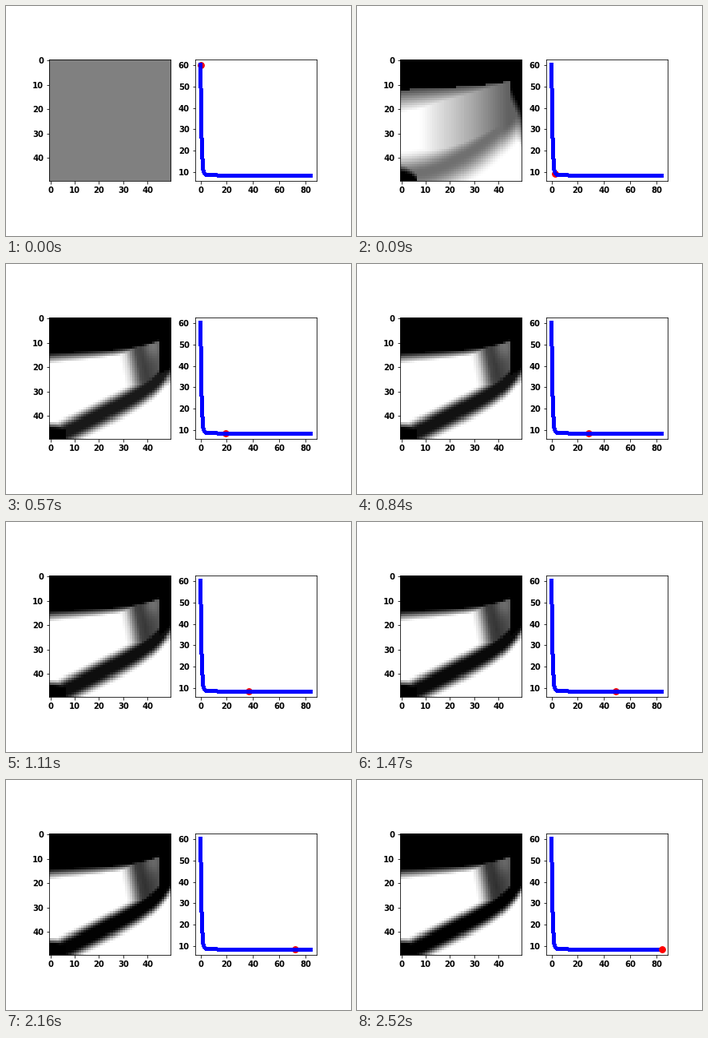
A matplotlib script that plays this animation: 432x288 px, repeating every 2.55 s.

```python
import numpy as np
import matplotlib.pyplot as plt
from matplotlib.animation import FuncAnimation

plt.rcParams["font.family"] = "DejaVu Sans"
plt.rcParams["font.weight"] = "bold"
plt.rcParams["font.size"] = 10

STEPS, SIZE = 85, 50
Y, X = np.mgrid[0:SIZE, 0:SIZE] + 0.5

# Shape parameters at a few iterations, interpolated on a log scale.
KEYS = np.log([3, 7, 19, 84])
SHAPE = {
    # top slab: edge row, rise at the right, darkness and depth below the edge
    "edge": [12.7, 14.3, 15.0, 15.0],
    "rise": [1.5, 2.4, 3.1, 3.1],
    "under": [0.70, 0.85, 0.95, 0.97],
    "depth": [9.5, 4.5, 4.3, 4.2],
    # strut centre line: start, slope, bend, hook at the right end
    "start": [47.8, 50.5, 50.6, 50.6],
    "slope": [0.05, 0.25, 0.50, 0.50],
    "bend": [0.0102, 0.0055, 0.0, 0.0],
    "hook": [0.0, 3.0, 6.5, 6.5],
    # strut profile: core darkness, half width of the core, fades on both sides
    "core": [0.56, 0.83, 0.90, 1.0],
    "half": [0.5, 1.0, 1.6, 2.0],
    "above": [10.0, 8.0, 5.2, 4.6],
    "below": [13.0, 7.2, 5.6, 5.0],
    # column at the right side: lower edge, its slope, fade
    "foot": [12.0, 18.0, 23.0, 26.0],
    "tilt": [2.2, 1.0, -0.5, -1.2],
    "fade": [16.0, 10.0, 7.0, 5.0],
    # block in the lower left corner
    "block": [46.3, 45.8, 45.6, 45.4],
    "arch": [0.065, 0.03, 0.01, 0.01],
    "haze": [5.0, 3.5, 2.8, 2.6],
    # web: light patch at the upper right, lean to the right
    "patch": [0.0, 0.10, 0.14, 0.12],
    "lean": [0.0, 0.2, 0.2, 0.2],
}
# Web between slab and strut: columns and their darkness
WEB_X = np.array([[8, 15, 22, 30, 38, 44],
                  [21, 25, 30, 34.5, 38, 44],
                  [29, 31.5, 34, 36, 38.5, 44],
                  [29.5, 31.5, 34, 36, 38.5, 44]])
WEB_D = np.array([[0, .12, .22, .35, .50, .62],
                  [0, .10, .30, .52, .69, .73],
                  [0, .15, .48, .70, .76, .66],
                  [0, .15, .52, .76, .81, .70]])


def at(t, values):
    return np.interp(t, KEYS, values)


def fall(u):
    """1 for u <= 0, down to 0 at u >= 1."""
    return 1 - np.clip(u, 0, 1)


def soft(u):
    u = np.clip(u, 0, 1)
    return 1 - u * u * (3 - 2 * u)


def shape(i):
    t = np.log(i)
    s = {name: at(t, values) for name, values in SHAPE.items()}

    below = Y - s["edge"] + 0.05 * X + s["rise"] * (X / 44) ** 5
    depth = s["depth"] * (1 - X / 75)
    slab = np.where(below < 0, 1, s["under"] * fall(below / depth))

    centre = (s["start"] - s["slope"] * X - s["bend"] * X ** 2
              - s["hook"] * (X / 49.5) ** 8)
    d = Y - centre
    lower = soft((d - s["half"]) / s["below"])
    strut = s["core"] * np.where(d < 0, soft((-d - s["half"]) / s["above"]), lower)

    web_x = [at(t, col) for col in WEB_X.T]
    web_d = [at(t, col) for col in WEB_D.T]
    web = np.interp(X - s["lean"] * (Y - 17), web_x, web_d)
    web -= s["patch"] * np.exp(-(X - 42) ** 2 / 10 - (Y - 12) ** 2 / 22)
    web *= np.where(d < 0, 1, lower)

    foot = s["foot"] + s["tilt"] * (X - 45.5)
    column = np.where(X > 45, fall((Y - foot) / s["fade"]), 0)

    top = s["block"] + s["arch"] * X ** 2
    block = fall((top - Y) / s["haze"]) * fall((X - 6.5) / 2)

    dark = np.max([slab, strut, web, column, block], axis=0)
    return 1 - np.clip(dark, 0, 1)


def density(i):
    # The first updates are bounded by a move limit.
    if i < 3:
        return 0.5 + np.clip(shape(3) - 0.5, -0.2 * i, 0.2 * i)
    return shape(i)


steps = np.arange(STEPS)
loss = 8.4 + 0.4 * np.exp(-(steps - 4) / 4)
loss[:4] = 60.1, 21.5, 11.0, 9.3

fig, (left, right) = plt.subplots(1, 2, figsize=(6, 4), dpi=72)
fig.subplots_adjust(left=0.125, right=0.9, bottom=0.1035, top=0.9035, wspace=0.2)

image = left.imshow(density(0), cmap="gray", vmin=0, vmax=1,
                    interpolation="nearest")
left.set_xticks(range(0, 50, 10))
left.set_yticks(range(0, 50, 10))

right.set_box_aspect(1)
right.plot(steps, loss, color="blue", lw=4, antialiased=False, zorder=2)
right.set_xlim(-4.2, 88.2)
right.set_ylim(5.8, 62.7)
right.set_xticks(range(0, 100, 20))
right.set_yticks(range(10, 70, 10))
dot = right.scatter([0], [loss[0]], s=60, color="red", zorder=1)


def update(i):
    image.set_data(density(i))
    dot.set_offsets([(i, loss[i])])
    dot.set_zorder(3 if i == STEPS - 1 else 1)
    return image, dot


anim = FuncAnimation(fig, update, frames=STEPS, interval=30,
                     repeat=True, repeat_delay=0, blit=False)
plt.show()
```
